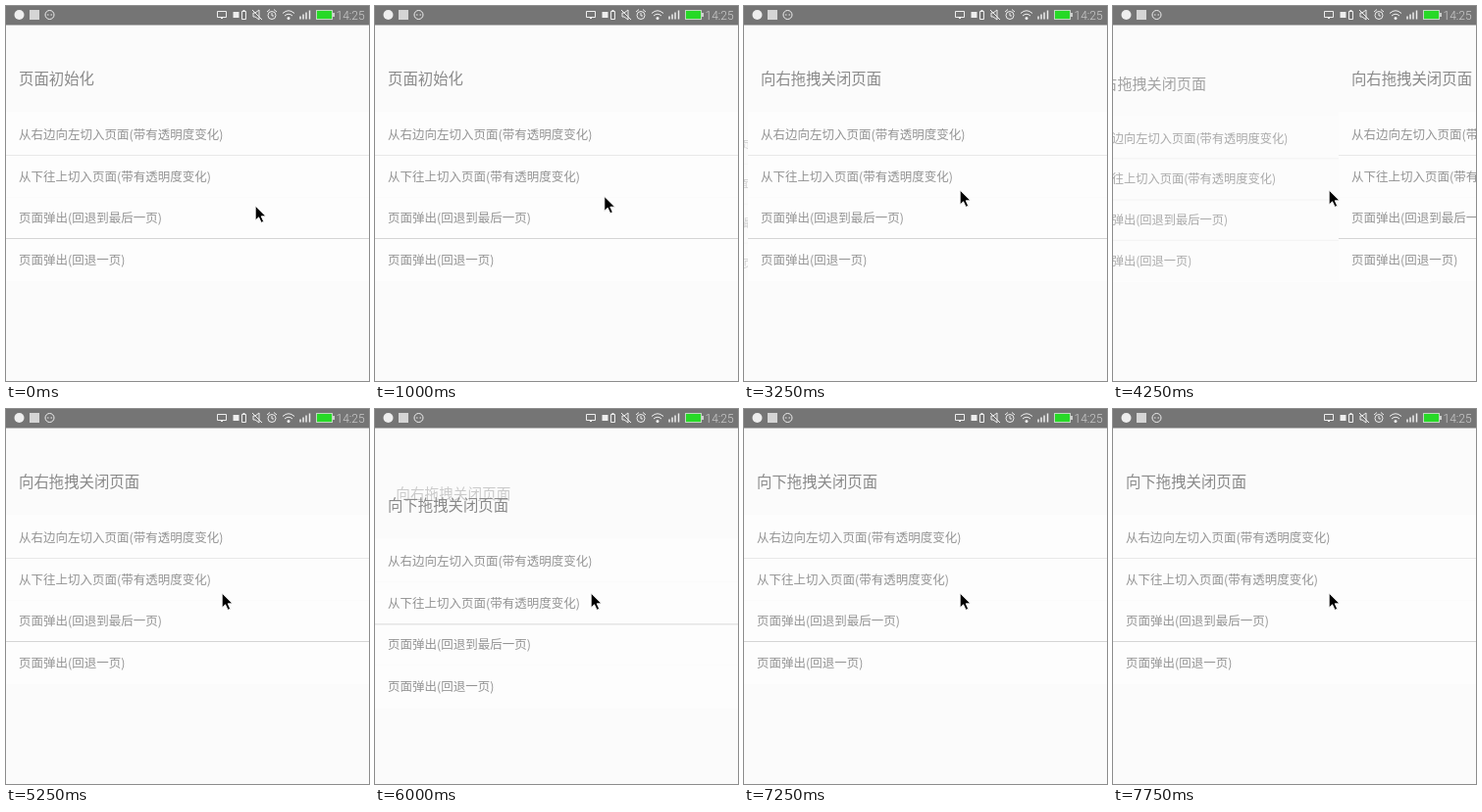
Animation, 370 px wide and 383 px high, one loop 8000 ms. Source, as an HTML page:

```html
<!DOCTYPE html>
<html lang="zh-CN">
<head>
<meta charset="utf-8">
<title>页面切换</title>
<style>
html, body { margin: 0; width: 100%; height: 100%; overflow: hidden; background: #fbfbfb; }
svg { display: block; width: 370px; height: 383px; }
text { font: 300 12.5px "Noto Sans CJK SC", "Noto Sans CJK", sans-serif; fill: #949494; }
.title { font-size: 15.4px; fill: #8a8a8a; }
.rule { height: 1px; width: 370px; fill: #e8e8e8; }
.rule.faint { fill: #fbfbfb; }
.rule.strong { fill: #d4d4d4; }
.rising .rule { fill: #fbfbfb; }
.rising .faint { fill: #d8d8d8; }
#under .rule { fill: #f0f0f0; }
#icons { fill: none; stroke: #eee; }
#icons .solid { fill: #eee; stroke: none; }
#clock { font: 300 12px Roboto, sans-serif; fill: #d0d0d0; }
</style>
</head>
<body>
<svg viewBox="0 0 370 383">
  <defs>
    <g id="list">
      <rect y="108" width="370" height="173" fill="#fdfdfd"/>
      <rect class="rule" y="152"/>
      <rect class="rule faint" y="195"/>
      <rect class="rule strong" y="237"/>
      <text x="13" y="136">从右边向左切入页面(带有透明度变化)</text>
      <text x="13" y="178.5">从下往上切入页面(带有透明度变化)</text>
      <text x="13" y="221">页面弹出(回退到最后一页)</text>
      <text x="13" y="263.5">页面弹出(回退一页)</text>
    </g>
  </defs>
  <g id="under"></g>
  <g id="top"></g>

  <rect width="370" height="19.5" fill="#757575"/>
  <g id="icons">
    <circle class="solid" cx="13.5" cy="9" r="5"/>
    <rect class="solid" x="24" y="4" width="10" height="10" opacity=".8"/>
    <circle cx="44.5" cy="9" r="4.5"/>
    <path d="M42 9h1.5M45.5 9h1.5"/>
    <path d="M215.5 5.5h9v6h-9zM219 12.5h2"/>
    <rect class="solid" x="231.5" y="6" width="6" height="6"/>
    <path d="M240.5 5.5h4v8h-4zM241.5 4.5h2"/>
    <path d="M252 7h2l4-3v10l-4-3h-2zM251 4l10 10"/>
    <circle cx="271" cy="9.5" r="4"/>
    <path d="M271 7v3h2M266 6l3-2.5M276 6l-3-2.5"/>
    <path d="M282 7.5q6-5.5 12 0M284 10q4-3.5 8 0"/>
    <circle class="solid" cx="288" cy="12.5" r="1.5"/>
    <path stroke-width="1.5" d="M300 13.5v-3M303 13.5v-5M306 13.5v-7M309.5 13.5v-9"/>
    <rect x="316.5" y="4.5" width="16" height="9" fill="#27d927" stroke-opacity=".7"/>
    <path stroke-width="1.5" d="M334 7v4"/>
  </g>
  <text id="clock" x="336.5" y="13.5">14:25</text>

  <path id="cursor" d="M0 0V15L3.4 11.8L6 17.3L8.500 16.200L6 10.800H10.800Z"
        fill="#000" stroke="#fff" stroke-width=".9"/>
</svg>
<script>
const LOOP = 8000, TICK = 250, DURATION = 600;
const W = 370, H = 658, CX = W / 2, CY = H / 2;
const RIGHT = '向右拖拽关闭页面', DOWN = '向下拖拽关闭页面';
const pushes = [
  { at: -DURATION, title: '页面初始化' },
  { at: 2783, title: RIGHT },
  { at: 4162, title: RIGHT },
  { at: 5600, title: DOWN, rising: true },
  { at: 6539, title: DOWN, rising: true }
];
const cursorMoves = [250, 500, 1000, 1250, 1750];
const $ = id => document.getElementById(id);

for (const id of ['under', 'top']) {
  $(id).innerHTML = '<text class="title" x="13" y="80"></text>';
  $(id).append(...[...$('list').children].map(node => node.cloneNode(true)));
}

function setPage(id, title, transform, opacity = 1) {
  const page = $(id);
  page.firstChild.textContent = title;
  page.setAttribute('transform', transform);
  page.setAttribute('opacity', opacity);
}

function draw(ms) {
  const t = Math.floor(ms % LOOP / TICK) * TICK;
  const k = pushes.findLastIndex(push => push.at <= t);
  const { at, title, rising } = pushes[k];
  const left = (1 - Math.min(1, (t - at) / DURATION)) ** 3;
  const p = 1 - left;

  // The entering page slides while the one below shrinks, fades and drifts left.
  setPage('top', title, rising ? `translate(0 ${left * H})` : `translate(${left * W} 0)`);
  $('top').classList.toggle('rising', !!rising && left > 0);
  $('under').style.display = left > 0 ? '' : 'none';
  if (left > 0) {
    const drift = rising ? 0 : -0.3 * W * p;
    setPage('under', pushes[k - 1].title,
      `translate(${CX + drift} ${CY}) scale(${1 - 0.05 * p}) translate(${-CX} ${-CY})`,
      1 - 0.6 * p);
  }

  const moved = cursorMoves.filter(m => m <= t).length / cursorMoves.length;
  $('cursor').setAttribute('transform', `translate(${254.2 - 34 * moved} ${204 - 16 * moved})`);
}

const start = performance.now();
function frame() {
  draw(performance.now() - start);
  requestAnimationFrame(frame);
}
frame();
</script>
</body>
</html>
```
